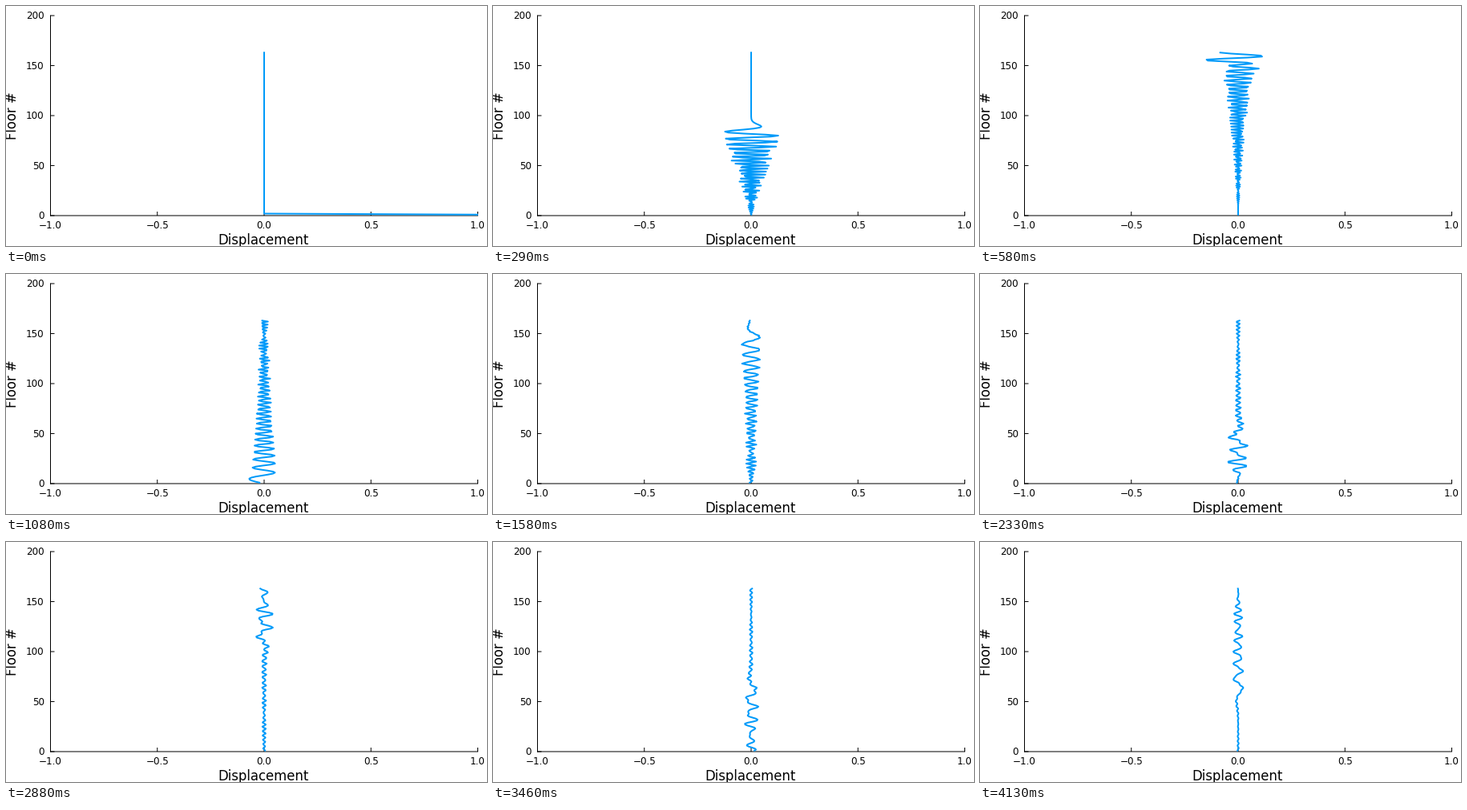
Animation, 600 px wide and 300 px high, one loop 4.18 s. Source, as a matplotlib script:

```python
import numpy as np
import matplotlib.pyplot as plt
from matplotlib.animation import FuncAnimation

W, H, DPI = 600, 300, 100
PX = 72 / DPI                      # points per pixel
LEFT, RIGHT, TOP, BOTTOM = 55.5, 588.5, 12, 262
TICK = 5                           # tick length in pixels

FLOORS = 163
STEPS = 100
TICK_MS, LOOP_MS = 10, 4180        # 24 steps a second on a 10 ms clock
SPEED = 12.695                     # floors travelled per step by long waves
DAMPING = 0.08                     # per step, for the stiffest mode

plt.rcParams["font.family"] = "DejaVu Sans"
plt.rcParams["path.snap"] = False

# Modes of a spring chain with a fixed base and a free top
floor = np.arange(1, FLOORS + 1)
wave = (2 * floor - 1) * np.pi / (2 * FLOORS + 1)
stiff = np.sin(wave / 2)
shapes = np.sin(np.outer(floor, wave))
weights = 4 / (2 * FLOORS + 1) * shapes[0]   # only the first floor is displaced


def displacement(step):
    decay = np.exp(-DAMPING * step * stiff**2)
    return shapes @ (weights * decay * np.cos(2 * SPEED * step * stiff))


def step_at(tick):
    return min(int((tick + 0.4) * 24 * TICK_MS / 1000), STEPS - 1)


fig = plt.figure(figsize=(W / DPI, H / DPI), dpi=DPI, facecolor="white")
ax = fig.add_axes([LEFT / W, 1 - BOTTOM / H,
                   (RIGHT - LEFT) / W, (BOTTOM - TOP) / H])
ax.set(xlim=(-1, 1), ylim=(0, 200), xticks=[], yticks=[])
ax.spines[["top", "right"]].set_visible(False)
ax.spines[["left", "bottom"]].set_linewidth(PX)


def label(x, y, text, size=12, **style):
    style = {"ha": "center", "va": "baseline", **style}
    fig.text(x / W, 1 - y / H, text, fontsize=size * PX, **style)


x_ticks = np.linspace(-1, 1, 5)
y_ticks = np.arange(0, 201, 50)
tick_style = dict(color="black", lw=PX, clip_on=False)
ax.vlines(x_ticks, 0, TICK * 200 / (BOTTOM - TOP), **tick_style)
ax.hlines(y_ticks, -1, -1 + TICK * 2 / (RIGHT - LEFT), **tick_style)

for v in x_ticks:
    x = LEFT + (v + 1) / 2 * (RIGHT - LEFT)
    label(x, 277.5, f"{v:.1f}".replace("-", "\u2212"))
for v in y_ticks:
    y = BOTTOM - v / 200 * (BOTTOM - TOP)
    label(47.7, y + 4.4, str(v), ha="right")
label(321.5, 298, "Displacement", 16.5)
label(13.3, 137, "Floor #", 16.5, rotation=90, rotation_mode="anchor")

line, = ax.plot(displacement(0), floor, color="#009AF9", lw=2 * PX,
                solid_joinstyle="round", solid_capstyle="projecting", zorder=5)


def update(tick):
    line.set_xdata(displacement(step_at(tick)))
    return line,


anim = FuncAnimation(fig, update, frames=LOOP_MS // TICK_MS, interval=TICK_MS,
                     repeat=True, repeat_delay=0)
plt.show()
```
